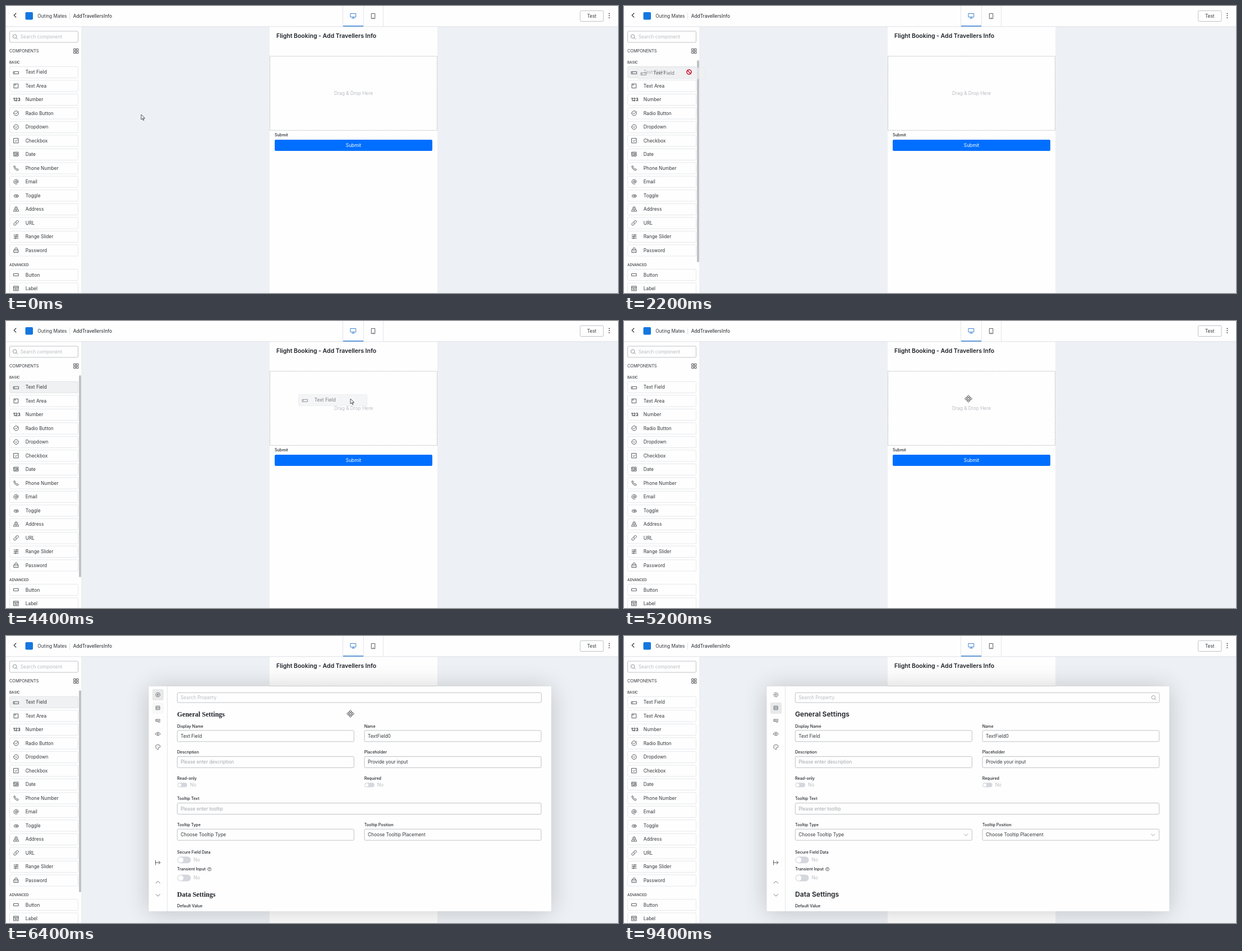
An HTML page that plays this animation: 1091x513 px, repeating every 10 s.

```html
<!DOCTYPE html>
<html lang="en">
<head>
<meta charset="utf-8">
<title>Form builder</title>
<style>
html, body { margin: 0; width: 100%; height: 100%; overflow: hidden; background: #edf0f4; }
svg { display: block; }
text { font: 8.3px Inter, Roboto, sans-serif; fill: #33363b; }
.dark { fill: #1c2026; }
.label { font-size: 7.1px; font-weight: 500; fill: #202328; }
.caps { font-size: 7.3px; }
.group { font-size: 6.2px; font-weight: 500; }
.hint { fill: #a2a5aa; }
.faint { fill: #b9bcc2; }
.title { font-size: 10.5px; font-weight: 600; fill: #1c2026; }
.head { font-size: 12.1px; font-weight: 600; fill: #1c2026; }
.serif { font: bold 12px "Liberation Serif", "Noto Serif", serif; }
.digits { font-size: 7.6px; font-weight: 700; }
.icon { fill: none; stroke: #45484d; stroke-width: .9; stroke-linecap: round; stroke-linejoin: round; }
.modal .icon { stroke-width: .75; }
.blue { stroke: #2a74cc; }
.gray { stroke: #85888d; }
.strong { stroke: #222; stroke-width: 1.1; }
.box { fill: #fefefe; stroke: #b9bcc0; stroke-width: .9; }
.row { fill: #fefefe; stroke: #e3e5e8; stroke-width: .9; }

/* One loop is 10 s, so 1% is 100 ms; every change is a hard step. */
.path, .hover, .ghost, .echo, .arrow, .move, .deny, .modal, .early, .late, .tab2 {
  animation: 10s step-end infinite;
}
.path { animation-name: path; }
.hover { animation-name: hover; }
.ghost { animation-name: ghost; }
.echo { animation-name: echo; }
.arrow { animation-name: arrow; }
.move { animation-name: move; }
.deny { animation-name: deny; }
.modal { animation-name: modal; }
.early { animation-name: early; }
.late { animation-name: late; }
.tab2 { animation-name: tab2; }

@keyframes path {
  0% { transform: translate(241px, 194px); }
  8% { transform: translate(200px, 174px); }
  10% { transform: translate(146px, 150px); }
  12% { transform: translate(70px, 122px); }
  14% { transform: translate(84px, 118px); }
  16% { transform: translate(95px, 116px); }
  18% { transform: translate(99px, 116px); }
  22% { transform: translate(116px, 118px); }
  24% { transform: translate(148px, 124px); }
  30% { transform: translate(205px, 132px); }
  32% { transform: translate(256px, 138px); }
  34% { transform: translate(301px, 141px); }
  38% { transform: translate(372px, 142px); }
  40% { transform: translate(462px, 141px); }
  42% { transform: translate(560px, 140px); }
  44% { transform: translate(614px, 139px); }
  72% { transform: translate(614px, 133px); }
  74% { transform: translate(613px, 126px); }
  76% { transform: translate(614px, 116px); }
  78% { transform: translate(615px, 106px); }
  80% { transform: translate(615px, 99px); }
  82% { transform: translate(615px, 97px); }
  84% { transform: translate(616px, 92px); }
  86% { transform: translate(618px, 72px); }
  88% { transform: translate(620px, 40px); }
  90%, to { transform: translate(622px, 6px); }
}
@keyframes hover { 0% { opacity: 0; } 12% { opacity: 1; } 52% { opacity: 0; } 58% { opacity: 1; } 72%, to { opacity: 0; } }
@keyframes ghost { 0% { opacity: 0; } 22% { opacity: .65; } 50%, to { opacity: 0; } }
@keyframes echo { 0% { opacity: 0; } 12% { opacity: .5; } 14%, to { opacity: 0; } }
@keyframes arrow { 0% { opacity: 1; } 12% { opacity: 0; } 42% { opacity: 1; } 52% { opacity: 0; } 72% { opacity: 1; } 92%, to { opacity: 0; } }
@keyframes move { 0% { opacity: 0; } 12% { opacity: 1; } 22% { opacity: 0; } 52% { opacity: 1; } 72%, to { opacity: 0; } }
@keyframes deny { 0% { opacity: 0; } 22% { opacity: 1; } 42%, to { opacity: 0; } }
@keyframes modal { 0% { opacity: 0; } 60% { opacity: .4; } 62%, to { opacity: 1; } }
@keyframes early { 0% { opacity: 1; } 66%, to { opacity: 0; } }
@keyframes late { 0% { opacity: 0; } 66%, to { opacity: 1; } }
@keyframes tab2 { 0% { opacity: 0; } 64% { opacity: .3; } 66%, to { opacity: 1; } }
</style>
</head>
<body>
<svg id="stage" width="1091" height="513" viewBox="0 0 1091 513"></svg>
<script>
const text = (x, y, str, cls = "", anchor = "start") =>
  `<text x="${x}" y="${y}" class="${cls}" text-anchor="${anchor}">${str}</text>`;
const rect = (x, y, w, h, attrs = "", r = 2) =>
  `<rect x="${x}" y="${y}" width="${w}" height="${h}" rx="${r}" ${attrs}/>`;
const line = (d, color = "#e3e5e8") => `<path d="${d}" fill="none" stroke="${color}"/>`;
const icon = (x, y, d, cls = "") =>
  `<path class="icon ${cls}" transform="translate(${x} ${y})" d="${d}"/>`;
const group = (cls, ...parts) => `<g class="${cls}">${parts.join("")}</g>`;
const circle = r => `M${-r} 0a${r} ${r} 0 1 0 ${2 * r} 0a${r} ${r} 0 1 0 ${-2 * r} 0`;

const lens = "M-4-.6a3.3 3.3 0 1 0 6.6 0a3.3 3.3 0 1 0-6.6 0M1.8 1.8 4.2 4.2";
const chevron = "M-3.4-1.7 0 1.7 3.4-1.7";

const basic = [
  ["Text Field", "M-4.5-.9h9v4h-9zM-3 .4v1.4"],
  ["Text Area", "M-3.7-3.5h7.4v7.4h-7.4zM-2-1.8h1M-2-1.8v1"],
  ["Number", ""],
  ["Radio Button", circle(4.2) + "M-1.8 0-.4 1.5 4-3"],
  ["Dropdown", circle(4.2) + "M-1.8-.7 0 1.1 1.8-.7"],
  ["Checkbox", "M-4.1-4.1h8.2v8.2h-8.2zM-2 0-.5 1.6 2.3-1.6"],
  ["Date", "M0 3h-4.3v-7h8.2v2.5M-4.3-2h6.5M-2.6 0h1M-2.6 1.6h1M-.2 1.2a2.3 2.3 0 1 0 4.6 0a2.3 2.3 0 1 0-4.6 0M2 0v1.3h1"],
  ["Phone Number", "M-3.8-3.2-2.5-4.2-.7-1.9-1.6-.9Q-.7 1 1.1 1.7L2.1.8 4.3 2.6 3.3 4Q.8 4.6-1.8 2-4.2-.6-3.8-3.2Z"],
  ["Email", circle(1.7) + "M1.7-1.5V.6Q2 2 3.2 1.5 4.2.8 4.1-.5A4.1 4.1 0 1 0 1.8 3.7"],
  ["Toggle", "M-1.8-.9h3.6a1.9 1.9 0 0 1 0 3.8h-3.6a1.9 1.9 0 0 1 0-3.8zM0 1a1.9 1.9 0 1 0 3.8 0a1.9 1.9 0 1 0-3.8 0"],
  ["Address", "M-2 0-3-.1-4.6 3.7h9.2L3-.1 2 0M0 2Q-2.2-.6-2.2-2.2A2.2 2.2 0 0 1 2.2-2.2Q2.2-.6 0 2ZM-.5-2.2h1"],
  ["URL", "M-.6-2.2 1-3.7A1.9 1.9 0 0 1 3.7-1L1.8.9A1.9 1.9 0 0 1-.9.9M.6 2.2-1 3.7A1.9 1.9 0 0 1-3.7 1L-1.8-.9A1.9 1.9 0 0 1 .9-.9"],
  ["Range Slider", "M-4-3h8M-4 0h8M-4 3h8M1.5-4v2M-1.5-1v2M1-1v2M-1 2v2"],
  ["Password", "M-3.8-.9h7.6v4.8h-7.6zM-2.2-1v-1.3a2.2 2.2 0 0 1 4.4 0V-1M-2 1.5h.2M0 1.5h.1M2 1.5h.1"],
];
const advanced = [
  ["Button", "M-4.2-2h8.4v4h-8.4z"],
  ["Label", "M-4.1-4h8.2v8h-8.2zM-4.1-1.8h8.2M-2.4 0h2M-2.4 1.9h4.6M1.2 0h1"],
];

const rowBody = ([name, d], y) =>
  (d ? icon(18, y - .3, d) : text(12.8, y + 2.8, "123", "digits")) + text(34.8, y + 2.9, name);
const row = (item, y) => rect(6.5, y - 10.2, 122, 20.2, 'class="row"') + rowBody(item, y);
const litRow = rect(6.5, 108.3, 122, 20.2, 'fill="#f0f1f2" stroke="#e3e5e8" stroke-width=".9"') + rowBody(basic[0], 118.5);

const sidebar = () => group("",
  rect(0, 37, 135, 476, 'fill="#fefefe"', 0), line("M135 37V513", "#e6e9ec"),
  rect(6.5, 45, 122, 20, 'class="box"'), icon(16.3, 55, lens, "gray"),
  text(25.8, 58, "Search component", "faint"),
  text(6, 83.4, "COMPONENTS", "caps"),
  icon(125, 80.5, "M-4-4h3.2v3.2H-4zM.8-4H4v3.2H.8zM-4 .8h3.2V4H-4zM.8 .8H4V4H.8z"),
  text(6, 102.7, "BASIC", "group"),
  ...basic.map((item, i) => row(item, 118.5 + 24.5 * i)),
  text(6, 464.8, "ADVANCED", "group"),
  ...advanced.map((item, i) => row(item, 480.7 + 24.5 * i)),
  group("hover", litRow, rect(130, 97, 4, 361, 'fill="#bfc0c2"'))
);

const header = () => group("",
  rect(0, 0, 1091, 36.5, 'fill="#fefefe"', 0), line("M0 36.8H1091", "#dfe2e6"),
  icon(16, 16.6, "M1.8-3.6-1.8 0 1.8 3.6", "strong"),
  rect(34.5, 11, 13.5, 13.5, 'fill="#1476e0"'),
  text(56.2, 21, "Outing Mates"), line("M113.5 12V24", "#e0e2e5"),
  text(119.8, 21, "AddTravellersInfo", "dark"),
  line("M600.5 0V36M637.5 0V36M672.5 0V36"),
  rect(601, 35.2, 36, 1.4, 'fill="#2a74cc"', 0),
  icon(619, 17.5, "M-4.7-4h9.4v6.2h-9.4zM0 2.2v2M-2.4 4.3h4.8", "blue"),
  icon(654.7, 18, "M-3-4.6h6v9.2h-6zM-.5 3h1"),
  rect(1023.5, 8.3, 41.5, 19.2, 'class="box"'), text(1044.2, 21, "Test", "", "middle"),
  ...[13.5, 17.2, 20.9].map(y => `<circle cx="1075.4" cy="${y}" r=".9" fill="#333"/>`)
);

const form = () => group("",
  rect(470, 37, 299, 476, 'fill="#fefefe"', 0),
  text(482, 56.6, "Flight Booking - Add Travellers Info", "title"),
  rect(470.5, 89.8, 298, 132.5, 'fill="none" stroke="#b4b6b9" stroke-width=".9" stroke-dasharray="2 1.2"', 0),
  text(619.5, 159, "Drag &amp; Drop Here", "faint", "middle"),
  text(479, 233.2, "Submit", "label"),
  rect(479, 239, 281, 20, 'fill="#006fff"'),
  `<text x="619.5" y="252" text-anchor="middle" style="fill:#fff">Submit</text>`
);

const field = (x, y, w, label, value, cls = "") =>
  text(x, y - 15.3, label, "label") + rect(x + .3, y - 10, w, 20, 'class="box"') + text(x + 6.3, y + 3, value, cls);
const toggle = (x, y, w, h) =>
  rect(x + .5, y - h / 2, w, h, 'fill="#d5d7de"', h / 2) +
  `<circle cx="${x + .5 + h / 2}" cy="${y}" r="${h / 2 - 1.2}" fill="#fff"/>` +
  text(x + w + 5.5, y + 2.7, "No", "faint");
const heading = (y, str) =>
  `<g class="early">${text(305, y, str, "head serif")}</g><g class="late">${text(305, y, str, "head")}</g>`;

const gear = () => {
  const points = Array.from({ length: 24 }, (_, i) => {
    const a = i * Math.PI / 12, r = i % 4 < 2 ? 4 : 3.3;
    return (r * Math.cos(a)).toFixed(2) + " " + (r * Math.sin(a)).toFixed(2);
  });
  return "M" + points.join("L") + "Z" + circle(1.3);
};
const modal = () => group("modal",
  rect(254.5, 92, 717.5, 402, 'fill="#000" opacity=".19" filter="url(#blur)"', 0),
  rect(254.5, 90, 717.5, 402, 'fill="#fefefe"', 1), line("M287.5 90V492"),
  group("early", rect(261, 95, 20, 20, 'fill="#e8e9ea"')),
  group("tab2", rect(261, 119, 20, 20, 'fill="#e8e9ea"')),
  icon(270.8, 105, gear()),
  icon(270.8, 128.5, "M-3.2-3.2h6.4v6.4h-6.4zM-3.2 0h6.4M-1.5-1.6h.1M.5-1.6h.1M-1.5 1.6h.1M.5 1.6h.1"),
  icon(270.8, 151.5, "M-.5 1.2h-3.4v-3.7h7.6v1.4M-2.5-.8h2M.2 1.2a1.7 1.7 0 1 0 3.4 0a1.7 1.7 0 1 0-3.4 0"),
  icon(270.8, 175, "M-4.6 0Q0-6.4 4.6 0 0 6.4-4.6 0Z" + circle(1.4)),
  icon(270.8, 198.3, "M.2 4.2A4.2 4.2 0 1 1 4.2-.4Q4 1.3 2 1 .2.9.8 2.4 1.4 4 .2 4.2ZM-2.2.2h.1M-1.2-2h.1M1.4-2h.1"),
  icon(270.8, 405, "M-4.2-4v8M-4 0h8M1.3-2.6 4 0 1.3 2.6", "strong"),
  icon(270.8, 440, "M-3.6 1.8 0-1.8 3.6 1.8"), icon(270.8, 463.3, "M-3.6-1.8 0 1.8 3.6-1.8"),
  rect(305.3, 101.3, 649, 17.7, 'class="box"'), text(311.3, 113.3, "Search Property", "faint"),
  heading(144, "General Settings"),
  field(305, 178.8, 315, "Display Name", "Text Field"),
  field(638.7, 178.8, 315, "Name", "TextField0"),
  field(305, 225.4, 315, "Description", "Please enter description", "hint"),
  field(638.7, 225.4, 315, "Placeholder", "Provide your input"),
  text(305, 256.6, "Read-only", "label"), toggle(305, 266.2, 17.5, 8),
  text(638.7, 256.6, "Required", "label"), toggle(638.7, 266.2, 17.5, 8),
  field(305, 308.6, 648.7, "Tooltip Text", "Please enter tooltip", "hint"),
  field(305, 355.2, 315, "Tooltip Type", "Choose Tooltip Type"),
  field(638.7, 355.2, 315, "Tooltip Position", "Choose Tooltip Placement"),
  text(305, 388.6, "Secure Field Data", "label"), toggle(305, 400.2, 24, 12),
  text(305, 419.4, "Transient Input", "label"),
  icon(362.6, 416.8, circle(3.1) + "M-1-.8Q-.8-1.8 0-1.8 1.1-1.7 1-.8 .8-.2 0 .4M0 1.6h.1"),
  toggle(305, 432.6, 24, 12),
  heading(466.2, "Data Settings"),
  text(305, 485.2, "Default Value", "label"),
  group("late", icon(944.5, 110.3, lens, "gray"),
    icon(609.7, 355.5, chevron, "gray"), icon(943, 355.5, chevron, "gray"))
);

const cross = "M0-6.5 2.6-3.6H.9V-.9H3.6V-2.6L6.5 0 3.6 2.6V.9H.9V3.6H2.6L0 6.5-2.6 3.6H-.9V.9H-3.6V2.6L-6.5 0-3.6-2.6V-.9H-.9V-3.6H-2.6Z";
const pointer = d => `<path d="${d}" fill="#fff" stroke="#33363b" stroke-width=".85" stroke-linejoin="round"/>`;
const cursor = () => group("path",
  group("ghost", `<g transform="translate(-99 -116)">${litRow}</g>`),
  group("arrow", pointer("M0 0v9l2.2-2 1.5 3.4 1.4-.6-1.5-3.2h3z")),
  group("move", pointer(cross)),
  group("echo", `<g transform="translate(2 1.5)">${pointer(cross)}</g>`),
  group("deny", `<path d="${circle(4)}M-2.8-2.8 2.8 2.8" fill="#fff" stroke="#c8102e" stroke-width="1.6"/>`)
);

document.getElementById("stage").innerHTML =
  `<defs><filter id="blur" x="-20%" y="-30%" width="140%" height="160%"><feGaussianBlur stdDeviation="22"/></filter></defs>` +
  rect(0, 0, 1091, 513, 'fill="#edf0f4"', 0) +
  form() + sidebar() + modal() + header() + cursor();
</script>
</body>
</html>
```
